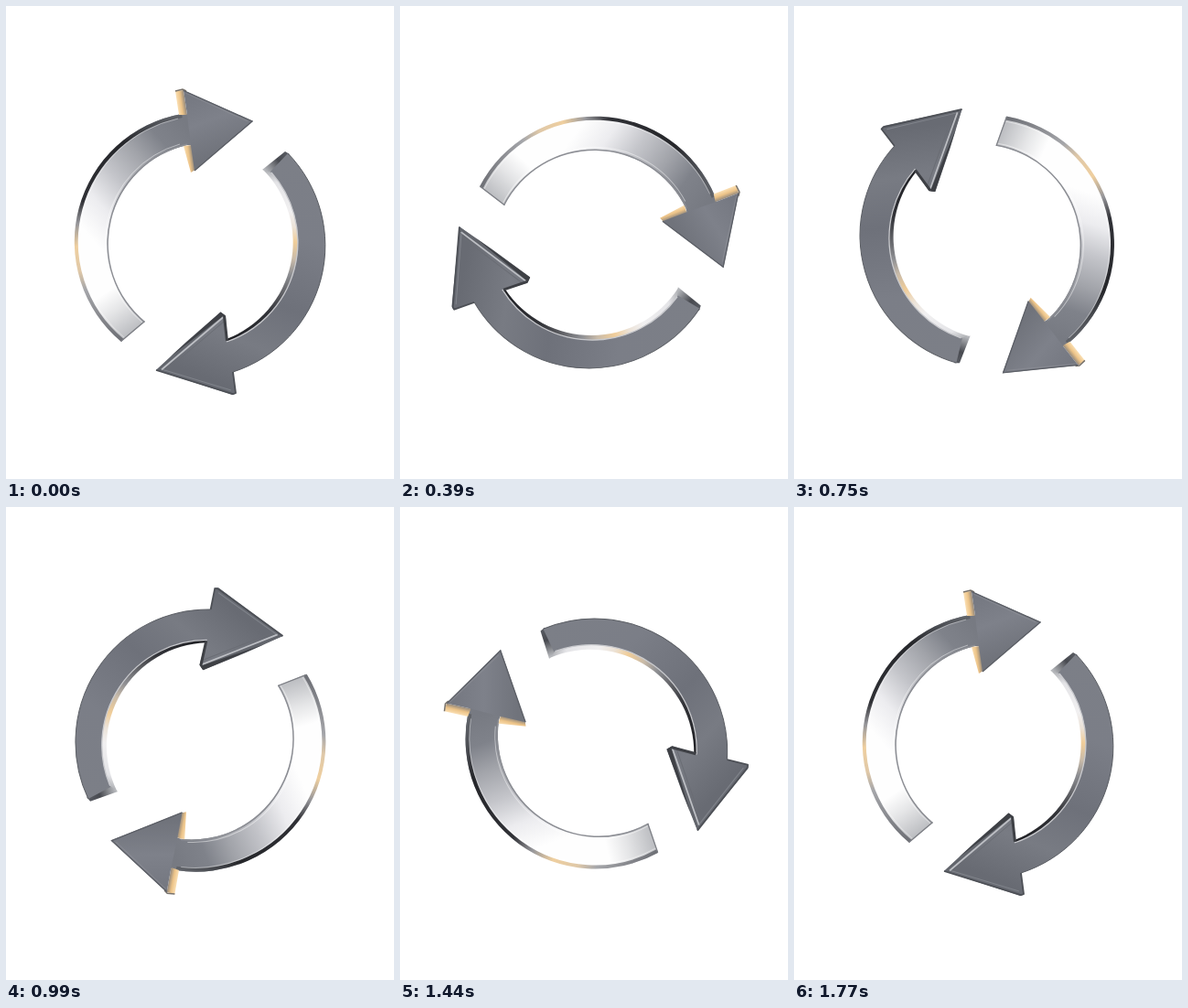
Write an HTML page that moves like this. It is 424 by 517 pixels and loops after 1800 ms.

```html
<!DOCTYPE html>
<html>
<head>
<meta charset="utf-8">
<style>
html, body { margin: 0; width: 100%; height: 100%; overflow: hidden; background: #fff; }
svg { display: block; }
path { fill: none; }
</style>
</head>
<body>
<svg width="424" height="517" viewBox="0 0 424 517">
  <defs>
    <linearGradient id="face" gradientUnits="userSpaceOnUse" x1="215" y1="150" x2="95" y2="256">
      <stop offset="0" stop-color="#777a82"/>
      <stop offset=".2" stop-color="#7f828a"/>
      <stop offset=".38" stop-color="#a1a3a9"/>
      <stop offset=".6" stop-color="#c4c5ca"/>
      <stop offset=".8" stop-color="#ececef"/>
      <stop offset="1" stop-color="#fefefe"/>
    </linearGradient>
    <linearGradient id="head" gradientUnits="userSpaceOnUse" x1="196" y1="95" x2="222" y2="165">
      <stop offset="0" stop-color="#747780"/>
      <stop offset=".5" stop-color="#7e818a"/>
      <stop offset="1" stop-color="#70737b"/>
    </linearGradient>
    <linearGradient id="tail" gradientUnits="userSpaceOnUse" x1="111" y1="312" x2="143" y2="358">
      <stop offset="0" stop-color="#a9abb0" stop-opacity="0"/>
      <stop offset=".4" stop-color="#a9abb0" stop-opacity=".3"/>
      <stop offset="1" stop-color="#a9abb0" stop-opacity=".85"/>
    </linearGradient>
    <linearGradient id="rim" gradientUnits="userSpaceOnUse" x1="0" y1="119" x2="0" y2="367">
      <stop offset="0" stop-color="#63666c"/>
      <stop offset=".12" stop-color="#26272b"/>
      <stop offset=".38" stop-color="#303136"/>
      <stop offset=".48" stop-color="#97979b"/>
      <stop offset=".58" stop-color="#efcf9f"/>
      <stop offset=".69" stop-color="#dfc8a8"/>
      <stop offset=".77" stop-color="#a5a6aa"/>
      <stop offset="1" stop-color="#6c6e74"/>
    </linearGradient>
    <linearGradient id="gold" gradientUnits="userSpaceOnUse" x1="185" y1="93" x2="194" y2="91.7">
      <stop offset="0" stop-color="#fbe0b4"/>
      <stop offset=".5" stop-color="#ecc388"/>
      <stop offset="1" stop-color="#94897c"/>
    </linearGradient>
    <linearGradient id="inside" gradientUnits="userSpaceOnUse" x1="0" y1="178" x2="0" y2="364">
      <stop offset="0" stop-color="#a9abaf"/>
      <stop offset=".08" stop-color="#e4e4e7"/>
      <stop offset=".25" stop-color="#f1f0f1"/>
      <stop offset=".34" stop-color="#ece3d8"/>
      <stop offset=".43" stop-color="#f0cd99"/>
      <stop offset=".53" stop-color="#c9bba9"/>
      <stop offset=".62" stop-color="#8e8f93"/>
      <stop offset=".84" stop-color="#323338"/>
      <stop offset="1" stop-color="#202125"/>
    </linearGradient>
    <linearGradient id="cap" gradientUnits="userSpaceOnUse" x1="309" y1="160" x2="284" y2="180">
      <stop offset="0" stop-color="#5a5d64"/>
      <stop offset=".45" stop-color="#484a50"/>
      <stop offset="1" stop-color="#b4b6ba"/>
    </linearGradient>
    <linearGradient id="dark" gradientUnits="userSpaceOnUse" x1="310" y1="165" x2="215" y2="405">
      <stop offset="0" stop-color="#7c7f87"/>
      <stop offset=".3" stop-color="#7b7e87"/>
      <stop offset=".6" stop-color="#6e717a"/>
      <stop offset=".8" stop-color="#787b83"/>
      <stop offset="1" stop-color="#686b73"/>
    </linearGradient>
    <clipPath id="body">
      <path d="M126 367A142 142 0 0 1 192 118L200 118 205 152 198 152A110.5 110.5 0 0 0 152 345Z"/>
    </clipPath>
  </defs>
  <g id="ring">
    <!-- bright arrow -->
    <g clip-path="url(#body)">
      <path d="M70 90H215V375H70Z" style="fill:url(#face)"/>
      <path d="M70 300H170V375H70Z" style="fill:url(#tail)"/>
      <path d="M126 367A142 142 0 0 1 192 118" stroke="url(#rim)" stroke-width="8"/>
      <path d="M131 364A137.5 137.5 0 0 1 188 123" stroke="#fff" stroke-opacity=".4"/>
      <path d="M198 152A110.5 110.5 0 0 0 152 345" stroke="#8c8e94" stroke-width="3"/>
      <path d="M190 151A112.5 112.5 0 0 0 149 346" stroke="#fff" stroke-opacity=".45"/>
      <path d="M126 367L152 345" stroke="#7d7f85" stroke-width="2.5"/>
    </g>
    <path d="M185 93L194 92 198 119 189 119ZM194 153L203 152 207 179 202 182Z" style="fill:url(#gold)"/>
    <path d="M185 93L193 91 197 93" stroke="#77716a" stroke-width="1.5"/>
    <path d="M194 92L270 126 206 180 202 152 198 119Z" style="fill:url(#head)"/>
    <path d="M194 92.5L269 126 206 180" stroke="#5c5f66" stroke-width="1.3"/>
    <path d="M196 95L264 126" stroke="#a2a4aa" stroke-opacity=".3"/>

    <!-- dark arrow -->
    <path d="M281 179A113 113 0 0 1 241 364L240 368A115 115 0 0 0 290 181Z" style="fill:url(#inside)"/>
    <path d="M280 179L305 159 310 162 290 182Z" style="fill:url(#cap)"/>
    <path d="M164 398L235 335 240 339 242 367A115 115 0 0 0 289 181L308 161A145 145 0 0 1 248 400L251 424 247 425Z" style="fill:url(#dark)"/>
    <path d="M290 182A115 115 0 0 1 241 367" stroke="#c9cace" stroke-width="1.3"/>
    <path d="M308 161A145 145 0 0 1 248 400" stroke="#5a5d63"/>
    <path d="M164 398L196 368 234.5 334.5 239 338 171 399Z" style="fill:#62656c"/>
    <path d="M170 397.5L237.5 340" stroke="#bdbfc4" stroke-width="1.8"/>
    <path d="M173 400L238 345" stroke="#6a6d74"/>
    <path d="M180 383L234.5 334.5 240 338.5 243 366 240 366 237 339Z" style="fill:#3e4045"/>
    <path d="M164 398L248 424 251 423 248 400" stroke="#4d5056" stroke-width="1.8"/>
    <path d="M170 397L246 420" stroke="#9a9da3" stroke-opacity=".5"/>
  </g>
</svg>
<script>
const ring = document.getElementById('ring');
const start = performance.now();

function draw(now) {
  const step = Math.floor(Math.max(0, now - start) % 1800 / 30);
  const u = step / 59;
  // one turn, gaining speed very slightly
  const angle = 360 * u * (0.971 + 0.029 * u);
  ring.setAttribute('transform', `rotate(${angle} 212 258)`);
  requestAnimationFrame(draw);
}
draw(start);
</script>
</body>
</html>
```
